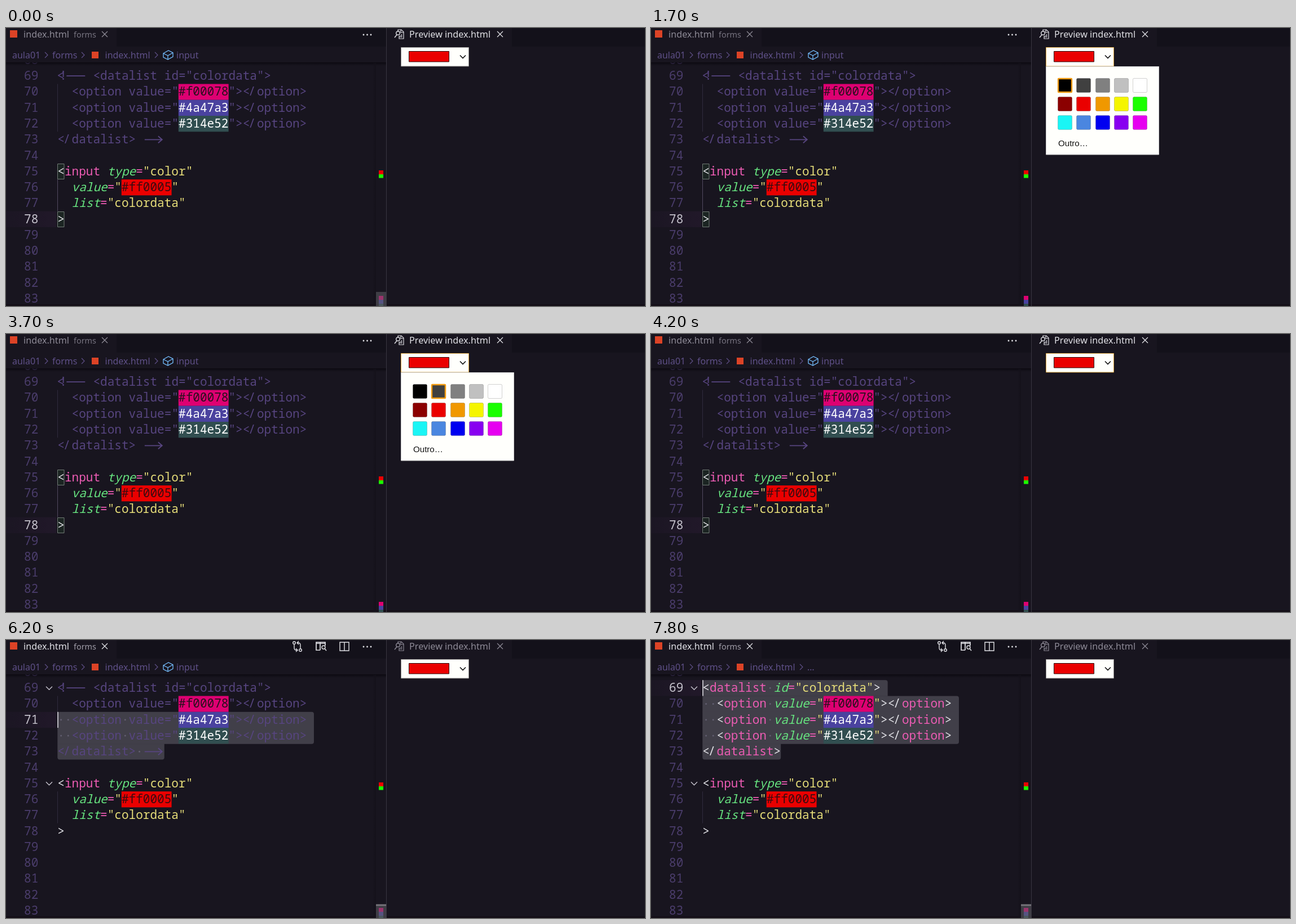
Write an HTML page with a canvas that moves like this. It is 1133 px wide and 494 px high and loops after 8 s.

```html
<!DOCTYPE html>
<html lang="en">
<head>
<meta charset="utf-8">
<title>Colour input with datalist</title>
<style>
  html, body { margin: 0; width: 100%; height: 100%; overflow: hidden; background: #18151f; }
  canvas { display: block; }
</style>
</head>
<body>
<canvas id="stage" width="1133" height="494"></canvas>
<script>
const ctx = document.getElementById('stage').getContext('2d');
const LOOP = 8000, STEP = 100;
const CODE_X = 91.3, CHAR = 12.63, LINE_H = 28.27, BASELINE = 21;
const MONO = '21.05px "Noto Sans Mono", monospace';
const BG = '#18151f', BAR = '#13111a';
const WHITE = '#e1e1e6', DIM = '#8d8a96', COMMENT = '#574580', CRUMB = '#5f5088';
const PINK = '#ed5cb4', GREEN = '#67e480', YELLOW = '#e7de79', RED = '#ea0000';
const OPTIONS = [['#f00078', '#de0072', '#26101c'], ['#4a47a3', '#4a429f', '#fff'], ['#314e52', '#314e50', '#fff']];
const SWATCHES = ['#000', '#404040', '#808080', '#c0c0c0', '#fff',
  '#8b0000', RED, '#f09800', '#f5f500', '#1aff00',
  '#1af5f5', '#4a86e0', '#0000f0', '#8800f0', '#e600f0'];
// [time, highlighted swatch]
const HOVERS = [[1700, 0], [2300, 1], [2400, 6], [2500, 5], [3100, 14], [3300, 9], [3500, 6], [3700, 1]];

const lineTop = n => 71.2 + (n - 69) * LINE_H;
const colX = c => CODE_X + c * CHAR;

function rect(x, y, w, h, color) {
  ctx.fillStyle = color;
  ctx.fillRect(x, y, w, h);
}

function box(x, y, w, h, radius, fill, stroke, width = 1) {
  ctx.beginPath();
  ctx.roundRect(x, y, w, h, radius);
  if (fill) { ctx.fillStyle = fill; ctx.fill(); }
  if (stroke) { ctx.strokeStyle = stroke; ctx.lineWidth = width; ctx.stroke(); }
}

function gradient(x0, y0, x1, y1, from, to) {
  const fill = ctx.createLinearGradient(x0, y0, x1, y1);
  fill.addColorStop(0, from);
  fill.addColorStop(1, to);
  return fill;
}

function path(d, color, width = 1.4) {
  ctx.strokeStyle = color;
  ctx.lineWidth = width;
  ctx.stroke(new Path2D(d));
}

function circle(x, y, r, color, filled) {
  ctx.beginPath();
  ctx.arc(x, y, r, 0, 7);
  if (filled) { ctx.fillStyle = color; ctx.fill(); }
  else { ctx.strokeStyle = color; ctx.lineWidth = 1.4; ctx.stroke(); }
}

function text(str, x, y, color, font = '16.2px "Noto Sans", sans-serif') {
  ctx.font = font;
  ctx.fillStyle = color;
  ctx.fillText(str, x, y);
}

const cross = (x, y, color) =>
  path(`M${x - 5} ${y - 5}l10 10m0 -10l-10 10`, color, 1.3);
const chevronRight = x => path(`M${x - 3} 43l5 5l-5 5`, CRUMB, 1.2);

// Each part is [string, color, italic]; '</', '<!--' and '-->' are drawn as ligatures.
function code(line, col, parts) {
  const base = lineTop(line) + BASELINE, mid = lineTop(line) + 14;
  for (const [str, color, italic] of parts) {
    const x = colX(col);
    const put = (s, dx) => text(s, x + dx, base, color, (italic ? 'italic ' : '') + MONO);
    if (str === '</') { put('<', 0); put('/', CHAR - 2.5); }
    else if (str === '<!--') { put('<', -1); put('!', 4); path(`M${x + 16} ${mid}h33`, color, 1.8); }
    else if (str === '-->') path(`M${x + 3} ${mid}h31m-7 -6l7 6l-7 6`, color, 1.8);
    else put(str, 0);
    col += str.length;
  }
}

function colorChip(line, col, [value, fill, ink]) {
  rect(colX(col) - .2, lineTop(line), 7 * CHAR + .4, LINE_H, fill);
  code(line, col, [[value, ink]]);
}

function drawTabs(editing) {
  rect(0, 0, 1133, 33, BAR);
  rect(0, 0, 196, 33, BG);
  rect(675, 0, 222, 33, BG);
  const left = editing ? WHITE : DIM, right = editing ? DIM : WHITE;
  rect(7, 4, 13, 13, '#dc4326');
  text('index.html', 31, 17, left);
  text('forms', 120, 17, editing ? '#a09da8' : '#777480', '14.4px "Noto Sans", sans-serif');
  cross(175, 11, left);
  for (const x of [634, 640.5, 647]) circle(x, 12, 1.4, WHITE, true);
  if (editing) {
    circle(511, 5, 2.3, WHITE);
    circle(522, 18, 2.3, WHITE);
    path('M511 8v6q0 4 4 4h2m-3 -3l3 3l-3 3M522 15v-6q0 -4 -4 -4h-2m3 -3l-3 3l3 3', WHITE);
    path('M557 18h-7v-14h16v6M550 6h16M557 4v14', WHITE, 1.7);
    circle(563, 13, 3, WHITE);
    path('M565 15l3 4', WHITE);
    path('M592 4h16v15h-16zM600 4v15', WHITE);
  }
  path('M695 6v-3h6l4 4v12h-8v-5M700 3v5h5M699 17v-4m2.500 4v-6', right, 1.2);
  circle(695, 9, 3.3, right);
  path('M693 12l-4 5', right);
  text('Preview index.html', 715, 17, right);
  cross(876, 11, right);
}

function drawBreadcrumbs(collapsed) {
  const crumb = (s, x) => text(s, x, 53.5, CRUMB, '16px "Noto Sans", sans-serif');
  rect(0, 33, 674, 28, BG);
  crumb('aula01', 11);
  chevronRight(72);
  crumb('forms', 82);
  chevronRight(137);
  rect(152, 42, 12, 12, '#dc4326');
  crumb('index.html', 175.5);
  chevronRight(267);
  if (collapsed) crumb('…', 277);
  else {
    path('M279 45l9 -5l8 4v7l-9 5l-8 -4zM279 45l8 4l9 -5M287 49v7', '#75beff', 1.3);
    crumb('input', 302);
  }
  rect(0, 61, 674, 6, gradient(0, 61, 0, 67, '#08060cc0', '#08060c00'));
}

function drawSelection(first, lengths) {
  for (let n = first; n <= 73; n++) {
    const w = lengths[n - 69] * CHAR;
    const prev = n > first ? lengths[n - 70] * CHAR : 0;
    const next = n < 73 ? lengths[n - 68] * CHAR : 0;
    box(CODE_X, lineTop(n), w, LINE_H + (n < 73 ? .4 : 0),
      [n === first ? 4 : 0, w > prev ? 4 : 0, w > next ? 4 : 0, n === 73 ? 4 : 0], '#413f49');
  }
}

function drawDatalist(live, selectedFrom) {
  const mark = live ? WHITE : COMMENT, tag = live ? PINK : COMMENT;
  const attr = live ? GREEN : COMMENT, str = live ? YELLOW : COMMENT;
  const shift = live ? 0 : 5;
  if (!live) code(69, 0, [['<!--', COMMENT]]);
  code(69, shift, [['<', mark], ['datalist ', tag], ['id', attr, live], ['=', tag], ['"colordata"', str], ['>', mark]]);
  OPTIONS.forEach((option, i) => {
    const n = 70 + i;
    code(n, 2, [['<', mark], ['option ', tag], ['value', attr, live], ['=', tag], ['"', str]]);
    colorChip(n, 17, option);
    code(n, 24, [['"', str], ['>', mark], ['</', mark], ['option', tag], ['>', mark]]);
  });
  code(73, 0, [['</', mark], ['datalist', tag], ['>', mark]]);
  if (!live) code(73, 12, [['-->', COMMENT]]);

  const dots = [live ? [9] : [4, 14], [0, 1, 9], [0, 1, 9], [0, 1, 9], live ? [] : [11]];
  dots.forEach((cols, i) => {
    if (69 + i >= selectedFrom)
      for (const c of cols) circle(colX(c + .5), lineTop(69 + i) + 14, 1.5, '#625e70', true);
  });
}

function drawEditor(t) {
  const editing = t >= 5800, live = t >= 7800;
  const caretLine = editing ? Math.max(69, Math.min(73, 73 - (t - 6000) / STEP)) : 78;
  const selectedFrom = t >= 6000 ? caretLine : 99;

  rect(0, lineTop(caretLine), 89, LINE_H, gradient(0, 0, 89, 0, '#1b1623', '#211829'));
  if (selectedFrom < 99) drawSelection(selectedFrom, live ? [26, 36, 36, 36, 11] : [31, 36, 36, 36, 15]);

  for (let n = 68; n <= 83; n++)
    text(n, 32, lineTop(n) + BASELINE, n === caretLine ? '#c5c2cc' : '#4b3d6c', MONO);

  if (selectedFrom > 70) rect(91, lineTop(70), 1, Math.min(3, selectedFrom - 70) * LINE_H, '#302a3d');
  rect(91, lineTop(76), 1, 2 * LINE_H, editing ? '#302a3d' : '#514a60');
  if (!editing)
    for (const n of [75, 78]) box(91.5, Math.round(lineTop(n)) + .5, 11.5, 27, 0, '#1b2422', '#727c76');

  drawDatalist(live, selectedFrom);
  code(75, 0, [['<', WHITE], ['input ', PINK], ['type', GREEN, true], ['=', PINK], ['"color"', YELLOW]]);
  code(76, 2, [['value', GREEN, true], ['=', PINK], ['"', YELLOW]]);
  colorChip(76, 9, ['#ff0005', RED, '#3a0b10']);
  code(76, 16, [['"', YELLOW]]);
  code(77, 2, [['list', GREEN, true], ['=', PINK], ['"colordata"', YELLOW]]);
  code(78, 0, [['>', WHITE]]);

  if (t >= 6200)
    for (const n of [69, 75]) path(`M71 ${lineTop(n) + 11.5}l5.500 5.500l5.500 -5.500`, '#c5c2cc');
  if (editing && (t < 6900 || t >= 7400))
    rect(selectedFrom < 99 ? 91 : colX(15), lineTop(caretLine), 2, LINE_H, '#b9b7bf');
}

function drawScrollbar(t) {
  rect(650, 62, 6, 432, gradient(650, 0, 656, 0, '#14111a00', '#14111a'));
  rect(661, 253, 8, 7, RED);
  rect(661, 260, 8, 6.5, '#1aff00');
  OPTIONS.forEach((option, i) => rect(661, 476 + 7 * i, 8, 7, option[1]));
  // The slider fades out once the pointer has left the editor.
  ctx.globalAlpha = t < 4800 ? Math.max(0, Math.min(1, (1600 - t) / 800)) : 1;
  rect(656, 469, 18, 25, '#63626a88');
  ctx.globalAlpha = 1;
  if (t >= 5800) rect(656, 470, 18, 2.5, '#77757b');
}

function drawPopup(t) {
  const active = HOVERS.filter(([time]) => time <= t).pop()[1];
  box(700.5, 68.5, 200, 156.5, 0, '#fffffc', '#c8c8c8');
  SWATCHES.forEach((color, i) => {
    const x = Math.round(721 + i % 5 * 33.35), y = 89 + Math.floor(i / 5) * 33;
    if (i === active) box(x + 1, y + 1, 24, 24, 1, color, '#f09a10', 2.4);
    else box(x + .5, y + .5, 25, 25, 2, color, '#0000002e');
  });
  text('Outro…', 722, 210, '#111', '15.1px "Liberation Sans", sans-serif');
}

function drawPreview(t) {
  const focused = t >= 1600 && t < 5700;
  rect(674, 0, 1, 494, '#393641');
  box(700.5, 34.5, 120, 33.5, 0, '#fffffc', focused ? '#d9a441' : '#918f8e');
  box(714.5, 41.5, 71, 18.5, 0, RED, '#2a0808');
  path('M805 48.500l5 5l5 -5', '#111', 1.6);
  if (t >= 1700 && t < 4200) drawPopup(t);
}

function frame(now) {
  const t = Math.floor(now % LOOP / STEP) * STEP;
  rect(0, 0, 1133, 494, BG);
  drawEditor(t);
  drawTabs(t >= 5800);
  drawBreadcrumbs(t >= 6600);
  rect(0, 491, 1133, 3, '#130e17');
  drawScrollbar(t);
  drawPreview(t);
  requestAnimationFrame(frame);
}
requestAnimationFrame(frame);
</script>
</body>
</html>
```
